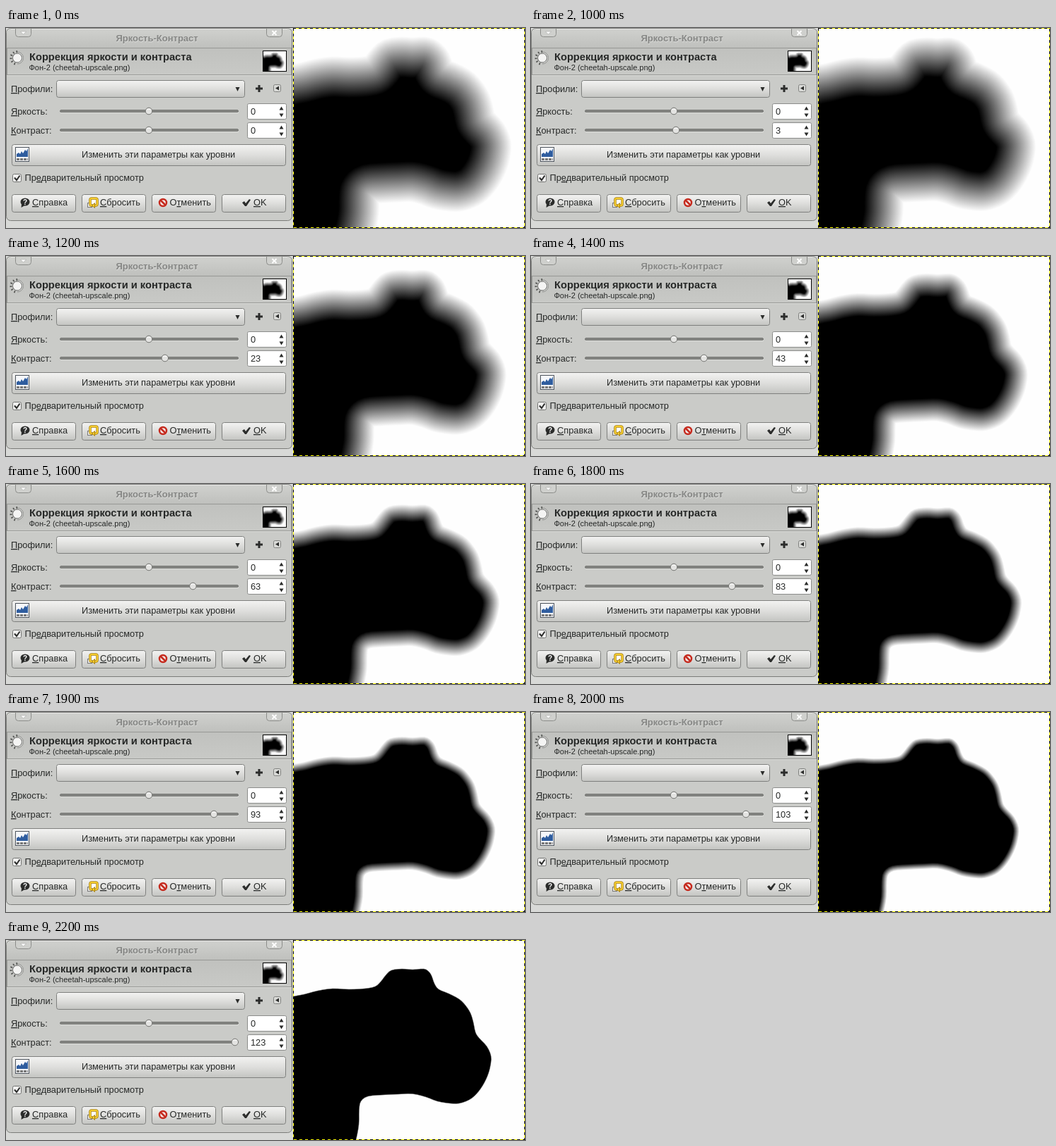
Write an HTML page with a canvas that moves like this. It is 734 px wide and 284 px high and loops after 4.7 s.

```html
<!DOCTYPE html>
<html lang="ru">
<meta charset="utf-8">
<title>Яркость-Контраст</title>
<style>
html, body { margin: 0; width: 100%; height: 100%; overflow: hidden; background: #d8d9d7; }
svg, canvas { position: absolute; left: 0; top: 0; }
#view { left: 406px; }
#thumb { left: 364px; top: 33px; }
text { font: 12.8px "Liberation Sans", Arial, sans-serif; fill: #262827; white-space: pre; }
.bold { font-weight: bold; }
.u { text-decoration: underline; }
.btn { fill: url(#face); stroke: #7f807e; }
.field { fill: #fff; stroke: #8b8c8a; }
.ink { fill: #2b2c2b; }
.tab { fill: #cfd0cd; stroke: #8b8c89; }
</style>
<canvas id="view" width="328" height="284"></canvas>
<svg width="734" height="284">
  <defs>
    <linearGradient id="face" x2="0" y2="1">
      <stop stop-color="#f3f3f2"/><stop offset=".5" stop-color="#dededc"/><stop offset="1" stop-color="#c3c4c1"/>
    </linearGradient>
    <linearGradient id="bar" x2="0" y2="1">
      <stop stop-color="#d0d1ce"/><stop offset="1" stop-color="#bfc0bd"/>
    </linearGradient>
    <linearGradient id="head" x2="0" y2="1">
      <stop stop-color="#c0c1be"/><stop offset="1" stop-color="#c8c9c6"/>
    </linearGradient>
    <g id="spin">
      <rect class="field" x="341.5" y="107.5" width="55" height="22" rx="2"/>
      <path class="ink" d="M386.500 116.500h6l-3-5zM386.500 121.500h6l-3 5z"/>
    </g>
    <g id="track">
      <rect x="76.500" y="116.500" width="252" height="3" rx="1.500" fill="#858683" stroke="#757673"/>
      <path d="M77 120.500h252" stroke="#e0e1de"/>
    </g>
    <g id="knob">
      <circle r="4.800" fill="#e3e3e1" stroke="#747572"/>
      <path d="M-2.500 -2a3.500 3.500 0 0 1 5 0" fill="none" stroke="#fff"/>
    </g>
    <path id="tick" d="M0 5l3-2 2 3 5-6 2 1-6 9h-2z"/>
  </defs>

  <!-- Window -->
  <rect x=".5" y=".5" width="404" height="273" rx="6" fill="#cacbc8" stroke="#7b7c79"/>
  <path d="M1 28V7q0-6 6-6h391q6 0 6 6v21z" fill="url(#bar)"/>
  <path d="M7 1.500h391" stroke="#e8e8e6"/>
  <rect x="1.500" y="28.500" width="402" height="38" fill="url(#head)" stroke="#989996"/>
  <path d="M1 67.500h403" stroke="#dadbd8"/>
  <path class="tab" d="M13.500 .5v8q0 4 4 4h14q4 0 4-4v-8z"/>
  <path class="tab" d="M368.500 .5v8q0 4 4 4h14q4 0 4-4v-8z"/>
  <path d="M20.500 5h8l-4 4z" fill="#fff" stroke="#999a97" stroke-width=".5"/>
  <path d="M376.500 4l6 6m0-6l-6 6" stroke="#fff" stroke-width="1.800"/>
  <g style="font-size:13px">
    <text class="bold" x="156" y="20" style="font-size:inherit;fill:#dcdddb">Яркость-Контраст</text>
    <text class="bold" x="155.500" y="19" style="font-size:inherit;fill:#858684">Яркость-Контраст</text>
  </g>

  <!-- Header -->
  <path d="M16 33.500a9 9 0 0 0 0 18" fill="none" stroke="#4b4c4a" stroke-width="3" stroke-dasharray="1.500 3.200"/>
  <path d="M16 34a8.500 8.500 0 0 1 0 17" fill="#dcdddb" stroke="#8a8b88"/>
  <circle cx="16" cy="42.500" r="6.500" fill="#f4f4f3" stroke="#666765"/>
  <text class="bold" x="33" y="46" style="font-size:14.67px">Коррекция яркости и контраста</text>
  <text x="32.500" y="60" style="font-size:11px">Фон-2 (cheetah-upscale.png)</text>
  <rect x="363.500" y="32.500" width="33" height="29" fill="#fff" stroke="#000"/>

  <!-- Profiles -->
  <text x="7" y="91"><tspan class="u">П</tspan>рофили:</text>
  <rect class="btn" x="71.500" y="74.500" width="266" height="24" rx="3"/>
  <path class="ink" d="M324.500 84h6l-3 6z"/>
  <path d="M358 81v10m-5-5h10" stroke="#2b2c2b" stroke-width="3"/>
  <rect x="378.500" y="80.500" width="10" height="10" rx="2" fill="#d9dad7" stroke="#80817f"/>
  <path class="ink" d="M386 82.500v6l-5-3z"/>

  <!-- Sliders -->
  <text x="7" y="123"><tspan class="u">Я</tspan>ркость:</text>
  <text x="7" y="150"><tspan class="u">К</tspan>онтраст:</text>
  <use href="#track"/><use href="#track" y="27"/>
  <use href="#spin"/><use href="#spin" y="27"/>
  <text x="346" y="123">0</text>
  <text x="346" y="150" id="value">0</text>
  <use href="#knob" x="202" y="118"/>
  <use href="#knob" id="slider" x="202" y="145"/>

  <!-- Levels and preview -->
  <rect class="btn" x="8.500" y="165.500" width="387" height="30" rx="3"/>
  <rect x="13.500" y="169.500" width="19" height="20" fill="#f6f8fb" stroke="#4d545d"/>
  <path d="M15 183v-4l3-2 2 2 2-4 2 3 3-5 2 2 2-4v12z" fill="#2f5d9f"/>
  <path d="M15 186.500h16" stroke="#777" stroke-width="3" stroke-dasharray="4 1"/>
  <text x="107" y="184">Изменить эти параметры как уровни</text>
  <rect x="9.500" y="207.500" width="12" height="11" rx="2" fill="#f1f1f0" stroke="#737472"/>
  <path d="M12 212.500l3 3.500 4.500-6.500" fill="none" stroke="#2b2c2b" stroke-width="2"/>
  <text x="26.500" y="217">Пр<tspan class="u">е</tspan>дварительный просмотр</text>

  <!-- Buttons -->
  <g class="btn">
    <rect x="8.500" y="236.500" width="90" height="25" rx="3"/>
    <rect x="107.500" y="236.500" width="90" height="25" rx="3"/>
    <rect x="206.500" y="236.500" width="90" height="25" rx="3"/>
    <rect x="305.500" y="236.500" width="90" height="25" rx="3"/>
  </g>
  <ellipse class="ink" cx="27" cy="247" rx="6.500" ry="5.500"/>
  <path class="ink" d="M22 250l-.5 5 5-3z"/>
  <text class="bold" x="24" y="251" style="font-size:10px;fill:#fff">?</text>
  <rect x="115.500" y="248.500" width="6" height="6" fill="#eee" stroke="#777"/>
  <rect x="119" y="242" width="10" height="10" rx="2" fill="#fff" stroke="#a78010" stroke-width="3.500"/>
  <rect x="119" y="242" width="10" height="10" rx="2" fill="none" stroke="#f4cb2e" stroke-width="2"/>
  <path d="M121.500 252l4-3.500v7z" fill="#f4cb2e" stroke="#a78010"/>
  <circle cx="222" cy="248" r="5" fill="#f4e6e4" stroke="#c52a1e" stroke-width="2.500"/>
  <path d="M218.500 244.500l7 7" stroke="#c52a1e" stroke-width="2.500"/>
  <use href="#tick" x="334" y="243" class="ink"/>
  <text x="37" y="252"><tspan class="u">С</tspan>правка</text>
  <text x="133" y="252"><tspan class="u">С</tspan>бросить</text>
  <text x="231.500" y="252">О<tspan class="u">т</tspan>менить</text>
  <text x="350" y="252"><tspan class="u">O</tspan>K</text>

  <!-- Layer outline -->
  <g fill="none">
    <rect x="406.500" y=".5" width="327" height="283" stroke="#ff0"/>
    <path d="M406 .5H733.500V284M406.500 0V283.500H734" stroke="#000" stroke-dasharray="4"/>
  </g>
</svg>
<canvas id="thumb" width="32" height="28"></canvas>
<script>
const $ = id => document.getElementById(id);
const view = $('view'), ctx = view.getContext('2d');
const W = view.width, H = view.height, REACH = 29;

// Silhouette edge in stage coordinates, closed outside the view
const edge = [
  [340, 98], [380, 87], [407, 80], [422, 77], [441, 72], [462, 69], [485, 70], [507, 69],
  [522, 66], [530, 59], [537, 50], [545, 43], [560, 41], [575, 42], [591, 41], [598, 45],
  [602, 51], [606, 62], [612, 70], [626, 76], [641, 84], [650, 93], [657, 104], [661, 117],
  [664, 131], [669, 139], [680, 151], [686, 165], [685, 179], [681, 193], [674, 207],
  [665, 219], [655, 227], [641, 232], [628, 232], [610, 229], [594, 223], [575, 218.5],
  [555, 219], [533, 220], [512, 222], [502, 229], [499.5, 241], [499, 262], [495, 284],
  [488, 310], [480, 360], [340, 360]
];

function smooth(pts, steps) {
  const n = pts.length, out = [];
  pts.forEach((p, i) => {
    const a = pts[(i + n - 1) % n], q = pts[(i + 1) % n], b = pts[(i + 2) % n];
    for (let s = 0; s < steps; s++) {
      const t = s / steps;
      out.push([0, 1].map(k => p[k] + t / 2 * (q[k] - a[k] +
        t * (2 * a[k] - 5 * p[k] + 4 * q[k] - b[k] + t * (3 * (p[k] - q[k]) + b[k] - a[k])))));
    }
  });
  return out;
}

// Soft brightness -0.5..0.5 from the signed distance to the edge
function makeField() {
  const pts = smooth(edge, 3);
  const segs = pts.map(([x, y], i) => {
    const [x2, y2] = pts[(i + 1) % pts.length], dx = x2 - x, dy = y2 - y;
    return { x, y, dx, dy, len2: dx * dx + dy * dy };
  });
  const field = new Float32Array(W * H);
  for (let i = 0; i < field.length; i++) {
    const px = 406.5 + i % W, py = Math.floor(i / W) + .5;
    let best = REACH * REACH, inside = false;
    for (const { x, y, dx, dy, len2 } of segs) {
      const rx = px - x, ry = py - y;
      const t = Math.max(0, Math.min(1, (rx * dx + ry * dy) / len2));
      const ex = rx - t * dx, ey = ry - t * dy;
      best = Math.min(best, ex * ex + ey * ey);
      if ((ry < 0) !== (ry < dy) && rx < dx * ry / dy) inside = !inside;
    }
    const v = Math.sqrt(best) / REACH / 2;
    field[i] = inside ? -v : v;
  }
  return field;
}

const field = makeField(), image = ctx.createImageData(W, H);
let shown = -1;

function draw(contrast) {
  const slope = Math.tan((contrast / 127 + 1) * Math.PI / 4);
  field.forEach((v, i) => {
    const g = 254 * Math.max(0, Math.min(1, .5 + v * slope));
    image.data.set([g, g, g, 255], i * 4);
  });
  ctx.putImageData(image, 0, 0);
  $('value').textContent = contrast;
  $('slider').setAttribute('x', 202 + contrast * .99);
  shown = contrast;
}

function frame() {
  const t = performance.now() % 4700;
  const contrast = t < 1000 ? 0 : Math.min(123, 3 + 10 * Math.floor((t - 1000) / 100));
  if (contrast !== shown) draw(contrast);
  requestAnimationFrame(frame);
}

draw(0);
const mini = $('thumb').getContext('2d');
mini.imageSmoothingQuality = 'high';
mini.drawImage(view, 0, 0, 32, 28);
frame();
</script>
</html>
```
